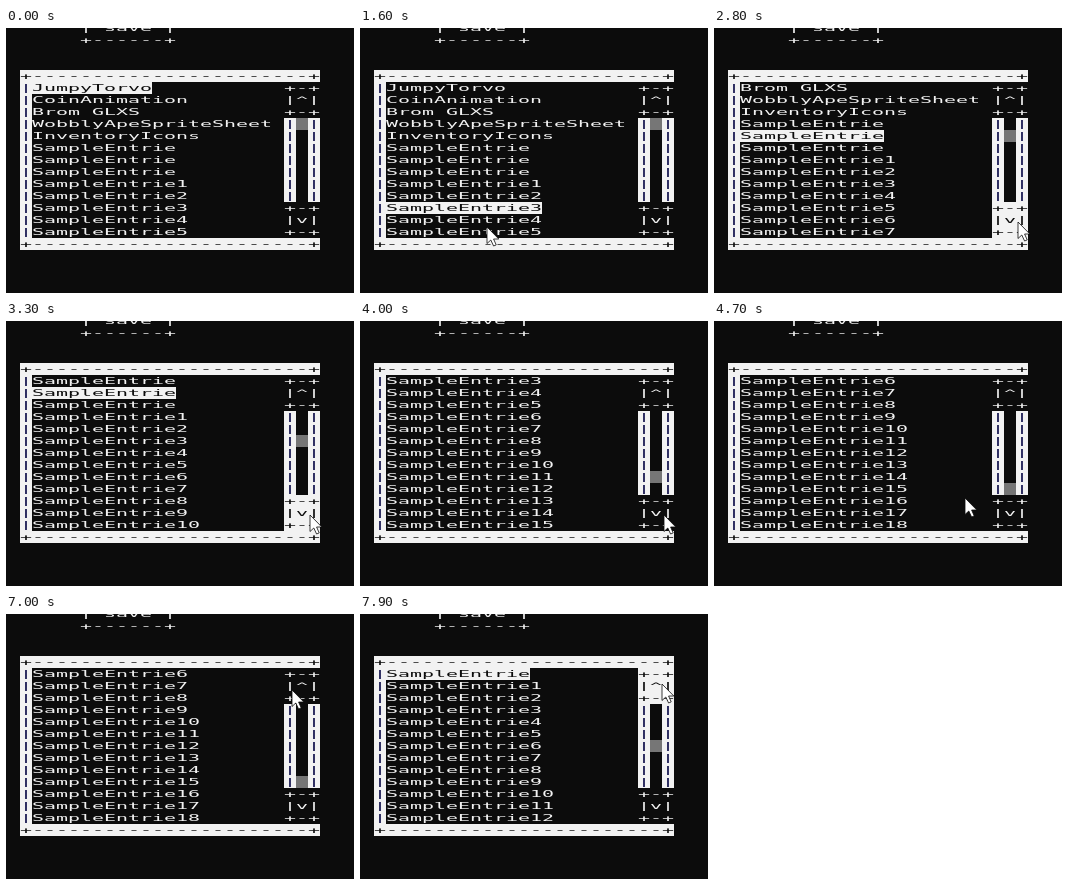
An HTML page with a canvas for the animation above (8000 ms loop, 348 px wide and 265 px high).

```html
<!DOCTYPE html>
<html lang="en">
<head>
<meta charset="utf-8">
<title>Console list</title>
<style>
  html, body { margin: 0; width: 100%; height: 100%; overflow: hidden; background: #0c0c0c; }
  canvas { display: block; }
</style>
</head>
<body>
<canvas id="stage" width="348" height="265"></canvas>
<script>
const ctx = document.getElementById('stage').getContext('2d');
const LOOP = 8000, TICK = 100, MOVE = 200, CLICK = 150;
const CELL = 12, LEFT = 14, TOP = 42, ROWS = 13;
const DARK = '#0c0c0c', LIGHT = '#f2f2f2', GRAY = '#767676', NAVY = '#0c0c48';

const items = ['JumpyTorvo', 'CoinAnimation', 'Brom GLXS', 'WobblyApeSpriteSheet',
  'InventoryIcons', ...Array(3).fill('SampleEntrie'),
  ...Array.from({ length: 18 }, (_, i) => 'SampleEntrie' + (i + 1))];
const MAX = items.length - ROWS;

// Where the pointer comes to rest: [arrival time, x, y]
const stops = [
  [100, 270, 117], [200, 152, 112], [1000, 158, 145], [1400, 134, 180], [1600, 127, 199],
  [2000, 140, 129], [2400, 296, 217], [2600, 304, 194], [4800, 197, 160],
  [5500, 132, 143], [5700, 167, 149], [6500, 125, 152], [7000, 286, 76], [7200, 302, 70]
];
const picks = [1000, 1400, 2000];

const clamp = (v, lo, hi) => Math.max(lo, Math.min(hi, v));
const clicks = (t, from, max) => clamp(Math.floor((t - from) / CLICK), 0, max);

// The pointer rests at each stop and leaves in time to reach the next.
function pointerAt(t) {
  let [, x, y] = stops[0];
  for (const [arrive, nx, ny] of stops) {
    const f = clamp((t - arrive) / MOVE + 1, 0, 1);
    x += (nx - x) * f;
    y += (ny - y) * f;
  }
  return [Math.round(x), Math.round(y)];
}

// Before any scrolling, a pick takes the item under the pointer.
function pickedAt(t) {
  const last = picks.filter(p => p <= t).pop();
  return last ? Math.floor((pointerAt(last)[1] - TOP) / CELL) - 1 : 0;
}

ctx.font = '9px "DejaVu Sans Mono", monospace';
const wide = CELL / ctx.measureText('0').width;

// Console text on a grid of square cells, so the whole font is wide.
function print(text, col, row, inverse, ink = inverse ? DARK : LIGHT) {
  const x = LEFT + col * CELL, y = TOP + row * CELL;
  ctx.fillStyle = inverse ? LIGHT : DARK;
  ctx.fillRect(x, y, text.length * CELL, CELL);
  ctx.fillStyle = ink;
  ctx.save();
  ctx.translate(x, y + 9);
  ctx.scale(wide, 1);
  ctx.fillText(text, 0, 0);
  ctx.restore();
}

const bar = (col, row) => print('|', col, row, true, NAVY);

function button(sign, row, lit) {
  ['+-+', `|${sign}|`, '+-+'].forEach((s, i) => print(s, 22, row + i, lit));
}

const arrow = new Path2D('M0 0V16.5L3.8 13L6.6 19L9.2 17.9L6.6 12H11.8Z');
function drawPointer(x, y) {
  ctx.save();
  ctx.translate(x, y);
  ctx.fillStyle = '#fff';
  ctx.strokeStyle = DARK;
  ctx.lineWidth = 0.8;
  ctx.fill(arrow);
  ctx.stroke(arrow);
  ctx.restore();
}

function draw(t) {
  const down = clicks(t, 2500, MAX), up = clicks(t, 7000, 6);
  const offset = down - up;
  const selected = pickedAt(t) + (up ? 1 : 0);
  const flash = t / TICK % 5 > 1;

  ctx.fillStyle = DARK;
  ctx.fillRect(0, 0, 348, 265);
  print('| save |', 5, -4);
  print('+------+', 5, -3);

  const edge = `+${'-'.repeat(23)}+`;
  print(edge, 0, 0, true);
  print(edge, 0, ROWS + 1, true);
  for (let r = 0; r < ROWS; r++) {
    const i = r + offset;
    bar(0, r + 1);
    print(items[i], 1, r + 1, i === selected);
  }

  button('^', 1, up && flash);
  button('v', 11, down && t < 4700 && flash);
  for (let r = 4; r < 11; r++) {
    bar(22, r);
    bar(24, r);
  }
  const thumb = 4 + Math.round(offset * 6 / MAX);
  ctx.fillStyle = GRAY;
  ctx.fillRect(LEFT + 23 * CELL, TOP + thumb * CELL, CELL, CELL);

  if (t >= stops[0][0]) drawPointer(...pointerAt(t));
}

const start = performance.now();
function frame() {
  const t = (performance.now() - start) % LOOP;
  draw(Math.floor(t / TICK) * TICK);
  requestAnimationFrame(frame);
}
frame();
</script>
</body>
</html>
```
